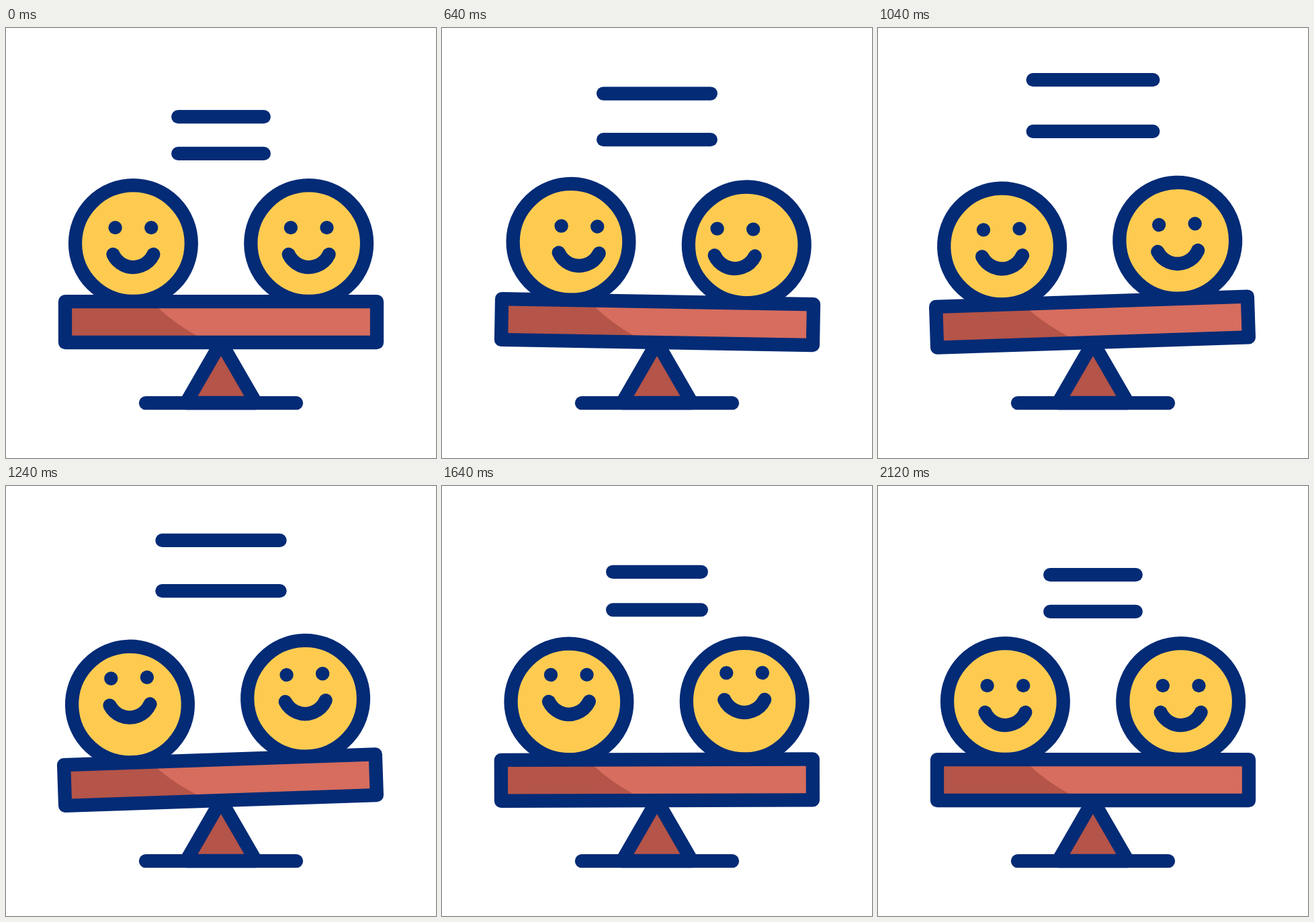
An HTML page with a canvas that plays this animation: 640 px wide and 640 px high, repeating every 2200 ms.

```html
<!DOCTYPE html>
<html lang="en">
<head>
<meta charset="utf-8">
<title>Balance</title>
<style>
  html, body { margin: 0; width: 100%; height: 100%; overflow: hidden; background: #fff; }
  canvas { display: block; width: 100vmin; height: 100vmin; margin: 0 auto; }
</style>
</head>
<body>
<canvas id="stage" width="640" height="640"></canvas>
<script>
const ctx = document.getElementById('stage').getContext('2d');
const LOOP = 2200, STEP = 40;
const NAVY = '#032b76', YELLOW = '#fecb50', RED = '#d66d5e', DARK = '#b55448';
const PIVOT = { x: 320, y: 468 };

// Motion tracks: [time, value] pairs, eased between neighbours
const tilt = [[80, 0], [540, 1.1], [1140, -2], [1820, 0]];
const lift = [[120, 0], [1060, 1], [1830, 0]];
const faces = [
  { x: 189.4, look: [[117, 0], [474, 20.5], [831, 0]], rise: [[890, 0], [1445, 20.5], [2000, 0]] },
  { x: 450.7, look: [[162, 0], [522, -20.5], [882, 0]], rise: [[940, 0], [1490, 20.5], [2060, 0]] }
];

// cubic-bezier(.6, 0, .4, 1), solved by bisection
function ease(x) {
  let lo = 0, hi = 1;
  for (let i = 0; i < 24; i++) {
    const u = (lo + hi) / 2, v = 1 - u;
    if (1.8 * u * v * v + 1.2 * u * u * v + u * u * u < x) lo = u; else hi = u;
  }
  return lo * lo * (3 - 2 * lo);
}

function valueAt(track, t) {
  if (t <= track[0][0]) return track[0][1];
  for (let i = 1; i < track.length; i++) {
    const [t0, a] = track[i - 1], [t1, b] = track[i];
    if (t < t1) return a + (b - a) * ease((t - t0) / (t1 - t0));
  }
  return track[track.length - 1][1];
}

function line(x0, x1, y) {
  ctx.beginPath();
  ctx.moveTo(x0, y);
  ctx.lineTo(x1, y);
  ctx.stroke();
}

function disc(x, y, r, color) {
  ctx.beginPath();
  ctx.arc(x, y, r, 0, Math.PI * 2);
  ctx.fillStyle = color;
  ctx.fill();
}

function drawEquals(p) {
  const scale = 1 + 0.4 * p, mid = 159.5 - 44 * p;
  const half = 63.8 * scale, gap = 27.4 * scale;
  line(320 - half, 320 + half, mid - gap);
  line(320 - half, 320 + half, mid + gap);
}

function drawStand() {
  ctx.beginPath();
  ctx.moveTo(320, 468);
  ctx.lineTo(372, 558);
  ctx.lineTo(268, 558);
  ctx.closePath();
  ctx.fillStyle = DARK;
  ctx.fill();
  ctx.stroke();
  line(208, 432, 558.2);
}

function drawFace(face, t) {
  ctx.save();
  ctx.translate(face.x, 320.6);
  disc(0, 0, 86.4, YELLOW);
  ctx.stroke();
  ctx.translate(valueAt(face.look, t), -valueAt(face.rise, t));
  disc(-26.8, -23.5, 10.2, NAVY);
  disc(26.8, -23.5, 10.2, NAVY);
  // smile: an arc through both mouth corners
  const r = 33.2, a = Math.asin(14.2 / r);
  ctx.beginPath();
  ctx.arc(0, 2.2, r, a, Math.PI - a);
  ctx.stroke();
  ctx.restore();
}

function drawBoard() {
  ctx.fillStyle = RED;
  ctx.fillRect(88, 407.2, 464, 60.8);
  ctx.beginPath();
  ctx.moveTo(88, 407.2);
  ctx.lineTo(216, 407.2);
  ctx.lineTo(227, 417.2);
  ctx.quadraticCurveTo(253, 441, 284, 458);
  ctx.lineTo(302, 468);
  ctx.lineTo(88, 468);
  ctx.fillStyle = DARK;
  ctx.fill();
  ctx.strokeRect(88, 407.2, 464, 60.8);
}

function draw(t) {
  ctx.fillStyle = '#fff';
  ctx.fillRect(0, 0, 640, 640);
  ctx.strokeStyle = NAVY;
  ctx.lineWidth = 20.3;
  ctx.lineCap = ctx.lineJoin = 'round';
  drawEquals(valueAt(lift, t));
  drawStand();
  ctx.save();
  ctx.translate(PIVOT.x, PIVOT.y);
  ctx.rotate(valueAt(tilt, t) * Math.PI / 180);
  ctx.translate(-PIVOT.x, -PIVOT.y);
  faces.forEach(face => drawFace(face, t));
  drawBoard();
  ctx.restore();
}

const start = performance.now();
function tick() {
  const t = (performance.now() - start) % LOOP;
  draw(Math.floor(t / STEP) * STEP);
  requestAnimationFrame(tick);
}
tick();
</script>
</body>
</html>
```
